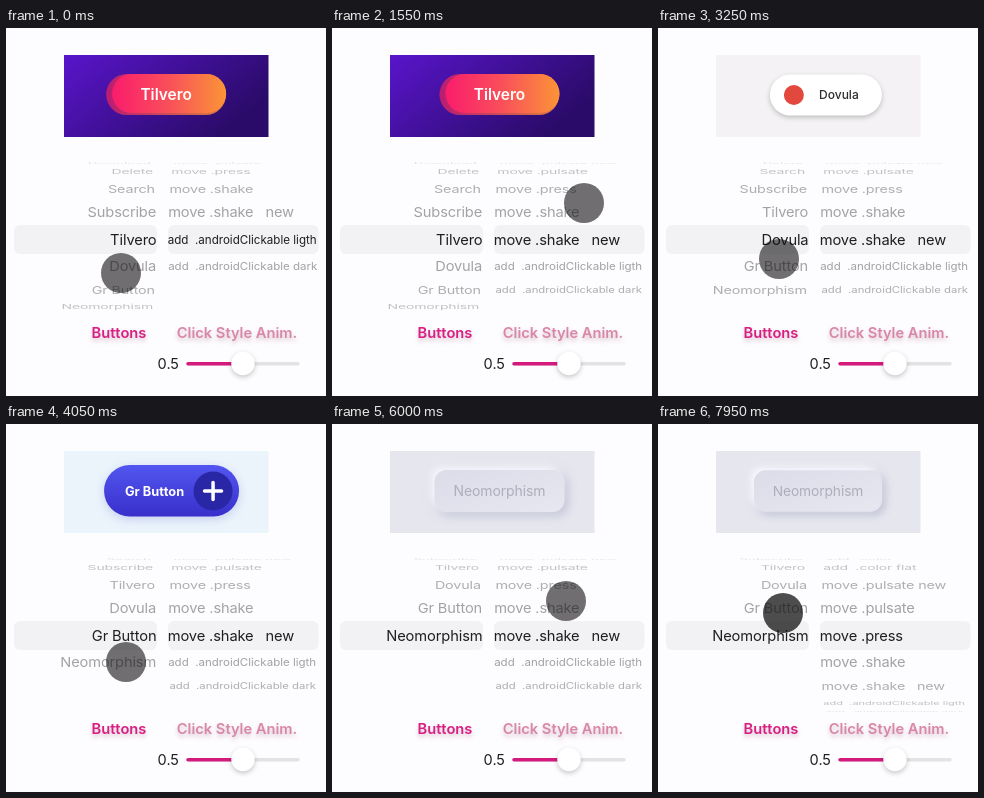
An HTML page that plays this animation: 320 by 368 pixels, repeating every 8 s.

```html
<!DOCTYPE html>
<html lang="en">
<head>
<meta charset="utf-8">
<title>Button styles</title>
<style>
  html, body { margin: 0; width: 100%; height: 100%; overflow: hidden; background: #fdfcfe; }
  svg { display: block; width: 320px; height: 368px; }
  text { font-family: Inter, Roboto, sans-serif; white-space: pre; }
  .wheel text { font-size: 14.7px; letter-spacing: -.13px; fill: #3a3a3c; }
  .wheel text.long { font-size: 11.6px; letter-spacing: 0; }
  .wheel.lit text { fill: #1f1e20; }
  .mid { text-anchor: middle; }
  .tab { font-size: 14.7px; font-weight: 600; filter: drop-shadow(0 3px 2px rgba(120, 40, 80, .25)); }
  .soft { filter: drop-shadow(0 2px 2.5px rgba(0, 0, 0, .22)); }
  .raised { filter: drop-shadow(-4px -4px 4px #f8f7fd) drop-shadow(4px 4px 4px #c6c7d8); }
  .glow { filter: drop-shadow(0 3px 5px rgba(70, 80, 200, .22)); }
</style>
</head>
<body>
<svg viewBox="0 0 320 368">
  <defs>
    <linearGradient id="night" x2="1" y2=".5">
      <stop stop-color="#5915cb"/><stop offset="1" stop-color="#2a0b69"/>
    </linearGradient>
    <linearGradient id="sunset">
      <stop stop-color="#fa1c6c"/><stop offset=".5" stop-color="#f9505a"/><stop offset="1" stop-color="#fb9437"/>
    </linearGradient>
    <linearGradient id="dusk">
      <stop stop-color="#b81c72"/><stop offset="1" stop-color="#e07f3c"/>
    </linearGradient>
    <linearGradient id="indigo" x2="0" y2="1">
      <stop stop-color="#5256f0"/><stop offset="1" stop-color="#392fcb"/>
    </linearGradient>
    <linearGradient id="clay" x2="1" y2="1">
      <stop stop-color="#dcdce9"/><stop offset="1" stop-color="#e7e7f1"/>
    </linearGradient>
    <clipPath id="band"><rect y="197" width="320" height="29"/></clipPath>
    <clipPath id="rest"><path d="M0 128H320V197H0ZM0 226H320V294H0Z"/></clipPath>
  </defs>
  <rect width="320" height="368" fill="#fdfcfe"/>

  <g class="preview">
    <rect x="58" y="27" width="204.5" height="82" fill="url(#night)"/>
    <g class="button">
      <rect x="-60" y="-21" width="120" height="41" rx="20.5" fill="url(#dusk)"/>
      <rect x="-54" y="-21" width="114" height="39" rx="19.5" fill="url(#sunset)"/>
      <text class="mid" y="5" font-size="15.4" font-weight="600" fill="#fff">Tilvero</text>
    </g>
  </g>
  <g class="preview">
    <rect x="58" y="27" width="204.5" height="82" fill="#f4f2f4"/>
    <g class="button">
      <rect class="soft" x="-56" y="-20.5" width="112" height="41" rx="20.5" fill="#fff"/>
      <circle cx="-32" r="10" fill="#e2483d"/>
      <text class="mid" x="13" y="4.3" font-size="12" font-weight="500" fill="#2d2c2f">Dovula</text>
    </g>
  </g>
  <g class="preview">
    <rect x="58" y="27" width="204.5" height="82" fill="#ebf4fb"/>
    <g class="button">
      <rect class="glow" x="-67.5" y="-26" width="135" height="51.5" rx="25.7" fill="url(#indigo)"/>
      <text class="mid" x="-17" y="4.5" font-size="12.8" font-weight="700" fill="#fff">Gr Button</text>
      <circle cx="41.5" r="19.5" fill="#2927a6"/>
      <path d="M33 0h17M41.5-8.5v17" stroke="#fff" stroke-width="3.5" stroke-linecap="round"/>
    </g>
  </g>
  <g class="preview">
    <rect x="58" y="27" width="204.5" height="82" fill="#e6e6ef"/>
    <g class="button">
      <rect class="raised" x="-65" y="-21" width="130" height="42" rx="12" fill="url(#clay)"/>
      <text class="mid" y="5" font-size="14" letter-spacing="-.1" fill="#adaeba">Neomorphism</text>
    </g>
  </g>

  <rect x="8" y="197" width="143" height="29" rx="6" fill="#f2f1f3"/>
  <rect x="162" y="197" width="150.5" height="29" rx="6" fill="#f2f1f3"/>
  <g class="wheel" clip-path="url(#rest)"></g>
  <g class="wheel lit" clip-path="url(#band)"></g>

  <text class="tab mid" x="113" y="310" fill="#d81f82">Buttons</text>
  <text class="tab mid" x="231" y="310" fill="#d987a6">Click Style Anim.</text>
  <text class="mid" x="162.3" y="341" font-size="14.5" fill="#1f1e20">0.5</text>
  <g stroke-width="3.4" stroke-linecap="round">
    <path d="M182 335.8H292" stroke="#e3e2e5"/>
    <path d="M182 335.8H237" stroke="#d51a7d"/>
  </g>
  <circle class="soft" cx="237" cy="335.5" r="11.7" fill="#fff"/>
  <circle id="pointer" r="20" fill="#0c0a0c"/>
</svg>
<script>
const LOOP = 8000, SWIPE = 330, TRAVEL = 350, SHAKE = 495, PRESS = 700;
const ROW = 27, STEP = 20.7 * Math.PI / 180, RADIUS = 76.3, CENTER = 211.5;
const LEFT = 0, RIGHT = 1;
const $$ = selector => [...document.querySelectorAll(selector)];
const previews = $$('.preview'), buttons = $$('.button'), layers = $$('.wheel');
const pointer = document.getElementById('pointer');

const wheels = [
  {
    items: ['Download', 'Delete', 'Search', 'Subscribe', 'Tilvero', 'Dovula', 'Gr Button', 'Neomorphism'],
    mid: 79.5, edge: 150.5, anchor: 'end', first: 4
  },
  {
    items: ['add  .color', 'add  .color flat', 'move .pulsate new', 'move .pulsate', 'move .press', 'move .shake',
      'move .shake   new', 'add  .androidClickable ligth', 'add  .androidClickable dark'],
    mid: 237, edge: 161.7, anchor: 'start', first: 7
  }
];

// Each swipe turns one wheel by one row
const swipes = [
  { at: 750, side: RIGHT, turn: -1 },
  { at: 2250, side: LEFT, turn: 1 },
  { at: 3520, side: LEFT, turn: 1 },
  { at: 4500, side: LEFT, turn: 1 },
  { at: 6150, side: RIGHT, turn: -1 },
  { at: 7050, side: RIGHT, turn: -1 },
  { at: LOOP, side: LEFT, turn: -1 }
];

// Where the pointer rests between swipes, and when it leaves
const stops = [
  { x: 115, y: 245, leave: 150 },
  { x: 252, y: 175, leave: 1750 },
  { x: 121, y: 231, leave: 3700 },
  { x: 120, y: 238, leave: 4800 },
  { x: 111, y: 254, leave: 5300 },
  { x: 234, y: 177, leave: 7350 },
  { x: 125, y: 189, leave: LOOP }
];

const clamp = v => Math.min(1, Math.max(0, v));
const ease = v => (1 - Math.cos(Math.PI * clamp(v))) / 2;
const mix = (a, b, v) => a + (b - a) * v;
const wave = v => Math.sin(2 * Math.PI * v);
const landed = (side, t) => swipes.filter(s => s.side === side && s.at + SWIPE <= t);
const lastLanding = list => list.length ? list.at(-1).at + SWIPE : 0;

for (const wheel of wheels) {
  wheel.rows = wheel.items.map(label => layers.map(layer => {
    const text = document.createElementNS('http://www.w3.org/2000/svg', 'text');
    const long = label.length > 20;
    text.textContent = label;
    text.classList.toggle('long', long);
    text.setAttribute('text-anchor', wheel.anchor);
    text.setAttribute('x', wheel.edge - wheel.mid);
    text.setAttribute('y', long ? 4.2 : 5.3);
    return layer.appendChild(text);
  }));
}

function turnWheel(wheel, side, t) {
  const pos = swipes.filter(s => s.side === side)
    .reduce((sum, s) => sum + s.turn * ease((t - s.at) / SWIPE), wheel.first);
  wheel.rows.forEach((layersOfRow, i) => {
    const angle = (i - pos) * STEP, depth = Math.cos(angle);
    const visible = Math.abs(angle) < Math.PI / 2;
    const scale = 1 - .09 * (1 - depth);
    layersOfRow.forEach((text, lit) => {
      text.style.display = visible ? '' : 'none';
      if (!visible) return;
      const y = CENTER + RADIUS * Math.sin(angle);
      text.setAttribute('transform', `matrix(${scale} 0 0 ${scale * depth} ${wheel.mid} ${y})`);
      text.style.opacity = lit ? 1 : .48 * depth ** .6;
    });
  });
}

function drawPreview(t) {
  const picks = landed(LEFT, t), styles = landed(RIGHT, t);
  const active = picks.length;
  previews.forEach((node, i) => node.style.display = i === active ? '' : 'none');
  const pressing = styles.length === 3;
  const shift = pressing ? 0 : 10 * wave((t - lastLanding(picks)) / SHAKE);
  const squeeze = pressing ? .025 * (1 - wave((t - lastLanding(styles)) / PRESS + .25)) : 0;
  buttons[active].setAttribute('transform', `translate(${160 + shift} 67) scale(${1 - squeeze})`);
}

function movePointer(t) {
  let { x, y } = stops[0], pressed = 0;
  stops.slice(1).forEach((stop, i) => {
    const v = ease((t - stops[i].leave) / TRAVEL);
    x = mix(x, stop.x, v);
    y = mix(y, stop.y, v);
  });
  for (const { at, turn } of swipes) {
    y -= turn * ROW * Math.sin(Math.PI * clamp((t - at) / SWIPE));
    pressed += clamp((t - at + 150) / 100) * clamp((at + SWIPE - t) / 100);
  }
  pointer.setAttribute('cx', x);
  pointer.setAttribute('cy', y);
  pointer.setAttribute('opacity', mix(.58, .72, pressed));
}

const start = performance.now();
function draw(now) {
  const t = Math.max(0, now - start) % LOOP;
  wheels.forEach((wheel, side) => turnWheel(wheel, side, t));
  drawPreview(t);
  movePointer(t);
  requestAnimationFrame(draw);
}
draw(start);
</script>
</body>
</html>
```
